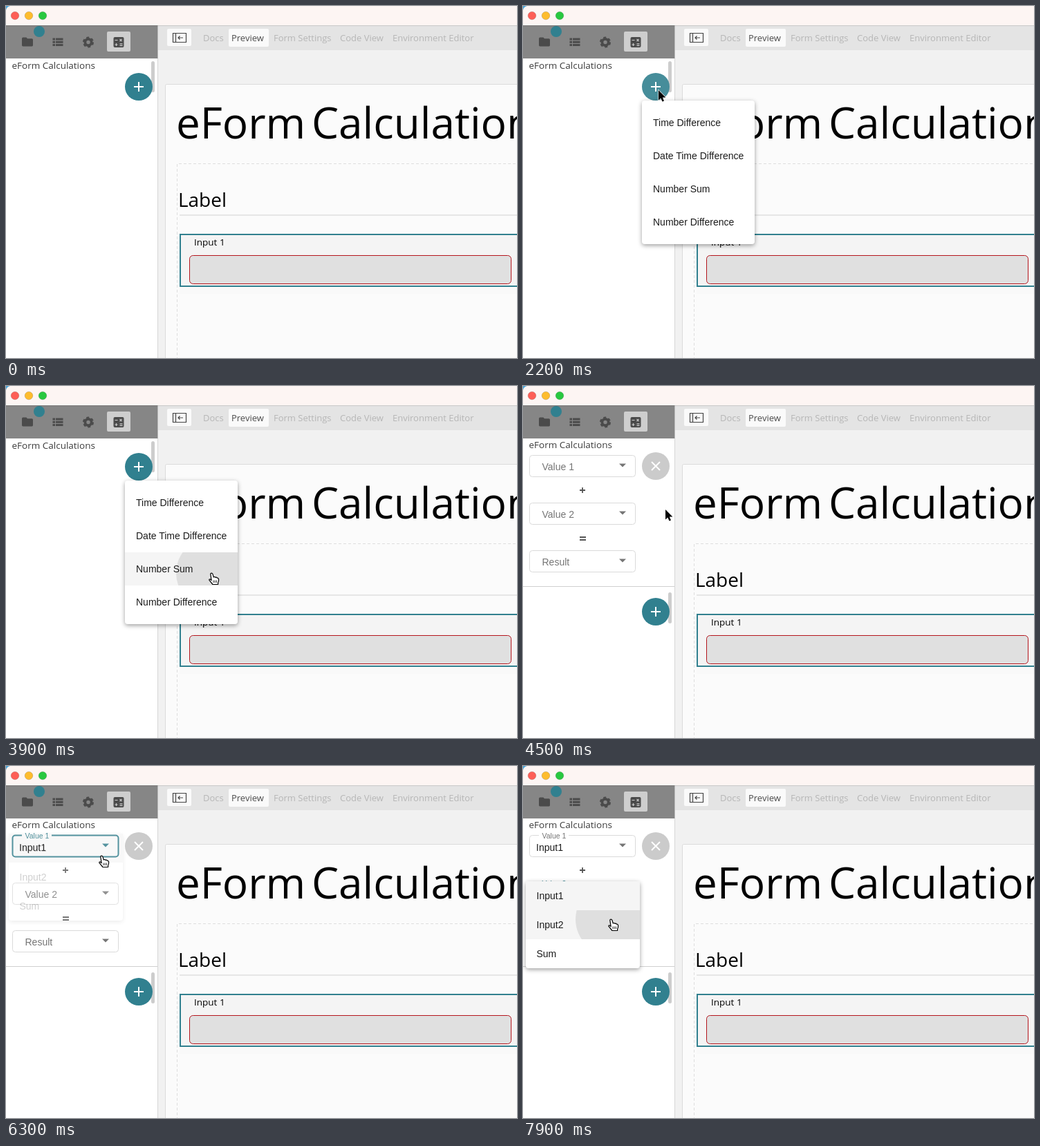
Write an HTML page that moves like this. It is 739 px wide and 510 px high and loops after 8 s.

```html
<!DOCTYPE html>
<html lang="en">
<head>
<meta charset="utf-8">
<title>eForm Calculations</title>
<style>
  html, body { margin: 0; width: 100%; height: 100%; overflow: hidden; background: #fff; }
  svg { display: block; }
  text { font-family: "Liberation Sans", Arial, sans-serif; font-size: 14px; white-space: pre; }
  .ui { font-family: "Trebuchet MS", "Open Sans", sans-serif; font-weight: 500; }
  .nav { font-size: 13px; fill: #b6b6b6; }
  .paper { filter: drop-shadow(0 2px 3px rgba(0, 0, 0, .38)); }
</style>
</head>
<body>
<svg id="stage" width="739" height="510" viewBox="0 0 739 510">
  <rect width="739" height="510" fill="#f1f1f1"/>

  <!-- window bar -->
  <rect width="739" height="28" fill="#fdf5f3"/>
  <path d="M0 0H6Q1 1 0 6Z" fill="#4aa3d8"/>
  <g stroke-opacity=".15" stroke="#000">
    <circle cx="13" cy="14" r="5.8" fill="#fe5f57"/>
    <circle cx="33" cy="14" r="5.8" fill="#febc2e"/>
    <circle cx="53" cy="14" r="5.8" fill="#28c840"/>
  </g>

  <!-- top navigation -->
  <rect x="220" y="28" width="519" height="36" fill="#e4e4e4"/>
  <rect x="233" y="33" width="35" height="25" rx="2" fill="#fafafa"/>
  <path d="M241.500 39.500h19v13h-19zM245.500 39.500v13M256 46h-7m2.500-2.500L249 46l2.500 2.500" fill="none" stroke="#444" stroke-width="1.200"/>
  <rect x="322" y="33" width="58" height="26" rx="2" fill="#fafafa"/>
  <text class="ui nav" x="285" y="51">Docs</text>
  <text class="ui nav" x="326" y="51" style="fill:#4a4a4a">Preview</text>
  <text class="ui nav" x="387" y="51">Form Settings</text>
  <text class="ui nav" x="483" y="51">Code View</text>
  <text class="ui nav" x="559" y="51">Environment Editor</text>

  <!-- form page -->
  <rect x="230.500" y="113.500" width="520" height="410" rx="2" fill="#fbfbfb" stroke="#dcdcdc"/>
  <text class="ui" y="192" style="font-size:62px;font-weight:400"><tspan x="246">eForm</tspan><tspan x="442">Calculations</tspan></text>
  <path d="M247.500 520V228.500H745" fill="none" stroke="#dedede" stroke-dasharray="4 3"/>
  <text class="ui" x="249" y="291" style="font-size:28px;font-weight:400">Label</text>
  <path d="M251 303H739" stroke="#e6e6e6" stroke-width="2"/>
  <rect x="251" y="407" width="488" height="10" fill="#f9f9f9"/>
  <rect x="252" y="331" width="500" height="75" fill="#f4f4f4" stroke="#31808f" stroke-width="2"/>
  <text class="ui" x="272" y="347" style="font-size:13.500px">Input 1</text>
  <rect x="265.500" y="361.500" width="465" height="41" rx="5" fill="#e0e0e0" stroke="#b4141c"/>

  <!-- sidebar -->
  <path d="M0 28H219V510H0Z" fill="#fff"/>
  <path d="M219.500 76V510" stroke="#d6d6d6"/>
  <rect y="28" width="219.500" height="48" fill="#868686"/>
  <path d="M0 28.500H739" stroke="#000" stroke-opacity=".12"/>
  <rect x="146" y="37" width="34" height="29" rx="2" fill="#cecece"/>
  <g fill="#4b4b4b">
    <path transform="translate(21.400 42.400) scale(.8)" d="M10 4H4Q2 4 2 6V18Q2 20 4 20H20Q22 20 22 18V8Q22 6 20 6H12Z"/>
    <path d="M67.500 46.500h3.500v3h-3.500zm0 4.300h3.500v3h-3.500zm0 4.300h3.500v3h-3.500zM72 46.500h10.500v3H72zm0 4.300h10.500v3H72zm0 4.300h10.500v3H72z"/>
    <rect x="155.500" y="45" width="15" height="15" rx="2"/>
  </g>
  <g fill="none" stroke="#4b4b4b">
    <circle cx="119" cy="52.500" r="4.600" stroke-width="3.800"/>
    <circle cx="119" cy="52.500" r="6.400" stroke-width="3.200" stroke-dasharray="3.700 3"/>
  </g>
  <path d="M157.500 49.500h4M164.500 48l3 3m0-3l-3 3M157.500 56h4m-2-2v4M164.500 54.800h4m-4 2.500h4" stroke="#cecece" stroke-width="1.200"/>
  <circle cx="48" cy="37" r="8" fill="#31808f"/>

  <g id="live"></g>
</svg>
<script>
const LOOP = 8000, TICK = 100;
const TEAL = '#31808f', GREY = '#757575';
const live = document.getElementById('live');

// time, x, y of the pointer tip
const pointerPath = [
  [900, 330, 560], [1000, 312, 413], [1600, 200, 134], [1800, 198, 125], [2000, 198, 125],
  [2100, 196, 122], [2900, 196, 122], [3400, 298, 271], [4100, 298, 271], [4500, 206, 179],
  [4900, 141, 123], [5200, 139, 130], [6300, 139, 130], [6700, 145, 183], [7350, 145, 183], [7700, 128, 222]
];

const ramp = (t, from, to) => Math.min(1, Math.max(0, (t - from) / (to - from)));
const smooth = u => u * u * (3 - 2 * u);
const within = (t, from, to) => t >= from && t < to;

function pointerAt(t) {
  let i = 0;
  while (i < pointerPath.length - 2 && pointerPath[i + 1][0] <= t) i++;
  const [t0, x0, y0] = pointerPath[i], [t1, x1, y1] = pointerPath[i + 1];
  const u = smooth(ramp(t, t0, t1));
  return { x: x0 + (x1 - x0) * u, y: y0 + (y1 - y0) * u };
}

function pointer(t, { x, y }) {
  if (t < 900) return '';
  const hand = within(t, 1600, 2000) || within(t, 3000, 4100) || t >= 4800;
  const shape = hand
    ? `<path d="M-2.200 1.600C-2.200-.400 .3-.400 .9 1.400L2.300 6Q4 4.800 5 6.400Q6.600 5.600 7.400 7.200Q9.400 7 9.600 9.200Q9.800 12 8.600 14V16.500H1L-4 10.400Q-4.600 8.600-2.800 8.900L-.9 10.600Z" fill="#fff" stroke="#000" stroke-width="1.200" stroke-linejoin="round"/>
       <path d="M2 10.500v3.500M4.200 10.500v3.500M6.400 10.500v3.500" stroke="#000" stroke-width=".8"/>`
    : '<path d="M0 0V14.500L3.300 11.400 5.500 16.500 8 15.400 5.800 10.500H10.400Z" stroke="#fff" stroke-width="1.200" paint-order="stroke"/>';
  return `<g transform="translate(${x} ${y})">${shape}</g>`;
}

const label = (x, y, text, fill = '#1c1c1c', size = 14) =>
  `<text x="${x}" y="${y}" fill="${fill}" style="font-size:${size}px">${text}</text>`;

const roundButton = (y, fill, glyph) =>
  `<circle cx="192" cy="${y}" r="20" fill="${fill}"/>
   <path transform="translate(192 ${y})" d="${glyph}" stroke="#fff" stroke-width="2"/>`;

// Outlined select; `shrink` moves its caption from the inside onto the border.
function select(y, caption, { value = '', shrink = 0, focus = false, hover = false } = {}) {
  const color = focus ? TEAL : hover ? '#444' : '#dadada';
  const captionColor = focus ? TEAL : GREY;
  const notch = shrink > .5 ? `<rect x="23" y="${y - 2}" width="43" height="5" fill="#fff"/>` : '';
  return `<rect x="9.500" y="${y + .5}" width="153" height="31" rx="4" fill="#fff" stroke="${color}" stroke-width="${focus || hover ? 2 : 1}"/>
    ${notch}<path d="M139 ${y + 12.500}h10l-5 5z" fill="${captionColor}"/>
    ${label(27.500, y + 22 - 17 * shrink, caption, captionColor, 14 - 3.500 * shrink)}
    ${label(19, y + 23, value)}`;
}

// Popup list that grows and fades in, then fades out.
function menu(t, { x, y, width, row, pad, indent, originX, items, open, close, click, lit }) {
  if (!within(t, open, close + 250)) return '';
  const grow = 1 - (1 - ramp(t, open, open + 200)) ** 2;
  const alpha = grow * (1 - ramp(t, close, close + 250));
  const tip = pointerAt(click);
  const rows = items.map((text, i) => {
    const top = y + pad + i * row;
    const hit = tip.y >= top && tip.y < top + row;
    const ripple = hit && t > click
      ? `<circle cx="${tip.x - x}" cy="${tip.y - top}" r="${Math.min(160, (t - click) * .52)}" fill-opacity=".09"/>` : '';
    return `<svg x="${x}" y="${top}" width="${width}" height="${row}">
      ${lit(i, top) ? '<rect width="100%" height="100%" fill="#f5f5f5"/>' : ''}${ripple}
      ${label(indent, row / 2 + 5, text)}</svg>`;
  }).join('');
  const scale = `${.75 + .25 * grow} ${.56 + .44 * grow}`;
  return `<g opacity="${alpha}" transform="translate(${originX} ${y}) scale(${scale}) translate(${-originX} ${-y})">
    <rect class="paper" x="${x}" y="${y}" width="${width}" height="${items.length * row + 2 * pad}" rx="4" fill="#fff"/>${rows}</g>`;
}

function scene(t) {
  const tip = pointerAt(t);
  const hasRow = t >= 4200;
  const fabY = hasRow ? 327 : 117;
  const over = (top, height) => tip.y >= top && tip.y < top + height;
  let out = `<text class="ui" x="8.500" y="${hasRow ? 90 : 91}" fill="#3c3c3c" style="font-size:13.500px">eForm Calculations</text>
    <rect x="210" y="${hasRow ? 299 : 80}" width="5" height="45" rx="2.500" fill="#cdcdcd"/>`;

  if (hasRow) {
    const chosen = t >= 6100;
    out += select(100, 'Value 1', {
      value: chosen ? 'Input1' : '', shrink: ramp(t, 5200, 5500),
      focus: within(t, 5200, 7100), hover: within(t, 4900, 5200)
    });
    out += select(169, 'Value 2', {
      shrink: ramp(t, 7100, 7400), focus: t >= 7100, hover: within(t, 6600, 7100)
    });
    out += select(238, 'Result');
    out += `<path d="M82 151h8m-4-4v8M82 219h9m-9 4h9" stroke="#555" stroke-width="1.800"/>
      <path d="M0 290.500H219" stroke="#d0d0d0"/>
      ${roundButton(116, '#cbcbcb', 'M-6-6L6 6M6-6L-6 6')}`;
  }

  out += roundButton(fabY, TEAL, 'M-7 0H7M0-7V7');
  if (within(t, 2000, 2700)) {
    out += `<circle cx="192" cy="117" r="${20 * ramp(t, 1900, 2200)}" fill="#fff" fill-opacity="${.1 * (1 - ramp(t, 2300, 2700))}"/>`;
  }

  out += menu(t, {
    x: 172, y: 137, width: 163, row: 48, pad: 8, indent: 16, originX: 172,
    items: ['Time Difference', 'Date Time Difference', 'Number Sum', 'Number Difference'],
    open: 2000, close: 4100, click: 3800,
    lit: (i, top) => within(t, 2900, 4400) && (t < 4100 ? over(top, 48) : i === 2)
  });

  const choices = {
    x: 4, width: 165, row: 42, pad: 0, indent: 15.500, originX: 86, items: ['Input1', 'Input2', 'Sum']
  };
  out += menu(t, { ...choices, y: 98, open: 5200, close: 6100, click: 5800, lit: i => i === 0 });
  out += menu(t, {
    ...choices, y: 167, open: 7100, close: 8000, click: 7800,
    lit: (i, top) => i === 0 || over(top, 42)
  });

  return out + pointer(t, tip);
}

let shown = -1;
function draw(now) {
  const t = Math.floor(now % LOOP / TICK) * TICK;
  if (t !== shown) live.innerHTML = scene(shown = t);
  requestAnimationFrame(draw);
}
draw(performance.now());
</script>
</body>
</html>
```
